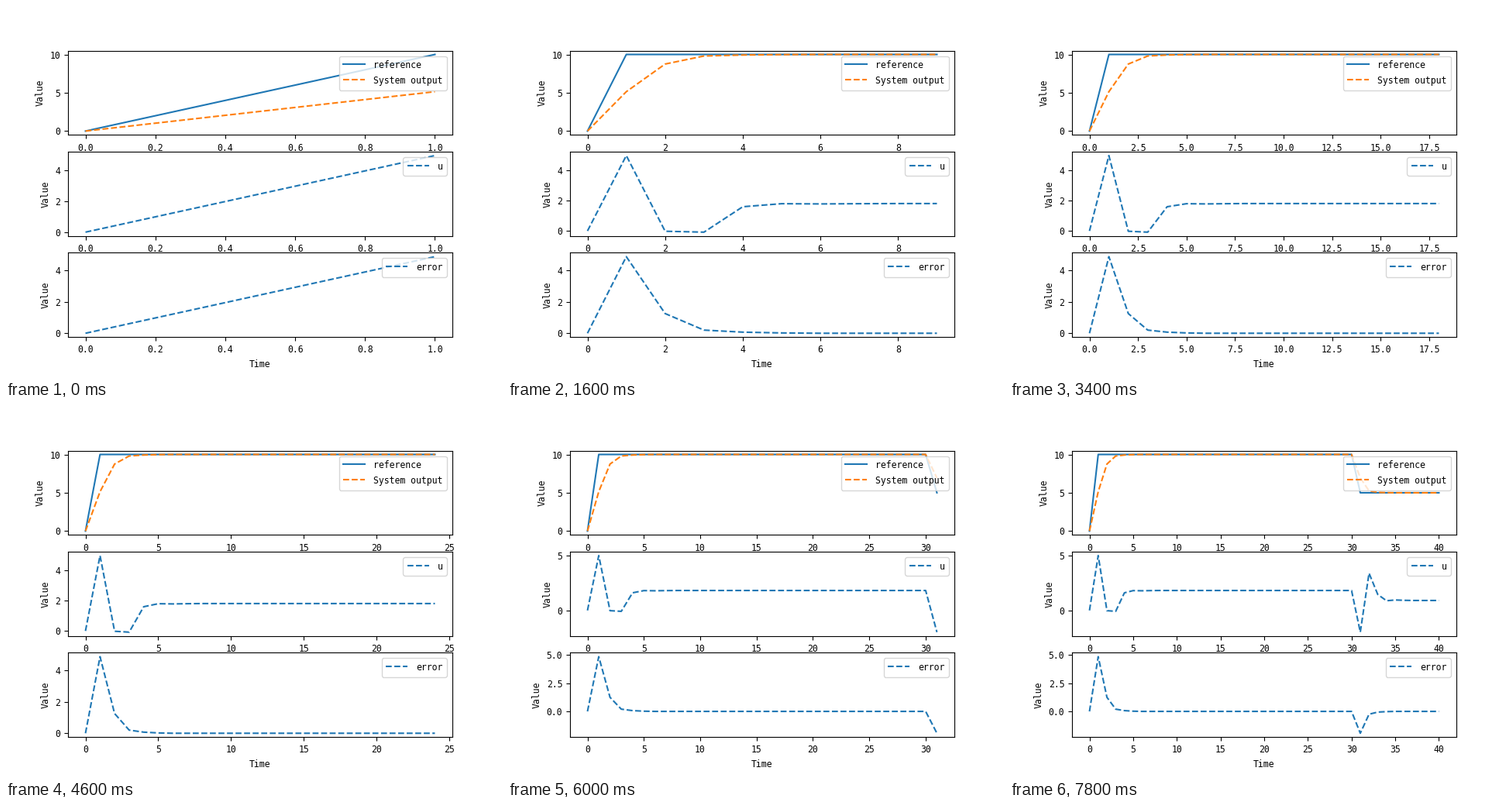
Write a matplotlib script that moves like this. It is 640x480 px and loops after 8000 ms.

```python
import numpy as np
import matplotlib.pyplot as plt
from matplotlib.animation import FuncAnimation
from matplotlib.ticker import MaxNLocator

STEPS = 40
TEXT_SIZE = 8.3

plt.rcParams.update({
    "font.family": "DejaVu Sans Mono",
    "axes.labelsize": TEXT_SIZE,
    "xtick.labelsize": TEXT_SIZE,
    "ytick.labelsize": TEXT_SIZE,
    "xtick.major.pad": 3.9,
})


def series(steady, start, after_drop):
    """Rise from zero, settle, then respond to the drop at t = 31."""
    y = np.full(STEPS + 1, steady[0], dtype=float)
    y[31:] = steady[1]
    y[:len(start)] = start
    y[31:31 + len(after_drop)] = after_drop
    return y


time = np.arange(STEPS + 1)
reference = series((10, 5), [0], [])
error = series((0, 0), [0, 4.86, 1.25, 0.2, 0.07, 0.02],
               [-1.94, -0.25, -0.06, -0.02])
control = series((1.81, 0.905),
                 [0, 4.98, -0.02, -0.08, 1.6, 1.8, 1.785, 1.8],
                 [-1.97, 3.38, 1.45, 0.88, 0.95, 0.92])
output = reference - error

fig, axes = plt.subplots(3, 1, figsize=(6.4, 4.8), dpi=100)
curves = []


def add_curve(ax, values, label, style="--"):
    line, = ax.plot([], [], style, label=label)
    curves.append((line, values))


add_curve(axes[0], reference, "reference", "-")
add_curve(axes[0], output, "System output")
add_curve(axes[1], control, "u")
add_curve(axes[2], error, "error")

for ax in axes:
    ax.set_ylabel("Value")
    ax.yaxis.set_major_locator(MaxNLocator(3, steps=[1, 2, 2.5, 5, 10]))
    legend = ax.legend(loc="upper right", fontsize=10)
    for text in legend.get_texts():
        text.set_fontsize(TEXT_SIZE)
axes[2].set_xlabel("Time")


def update(frame):
    count = frame + 2
    for line, values in curves:
        line.set_data(time[:count], values[:count])
    for ax in axes:
        ax.relim()
        ax.autoscale_view()
    return [line for line, _ in curves]


anim = FuncAnimation(fig, update, frames=STEPS, interval=200,
                     init_func=lambda: update(0), repeat=True,
                     repeat_delay=0, blit=False)
plt.show()
```
